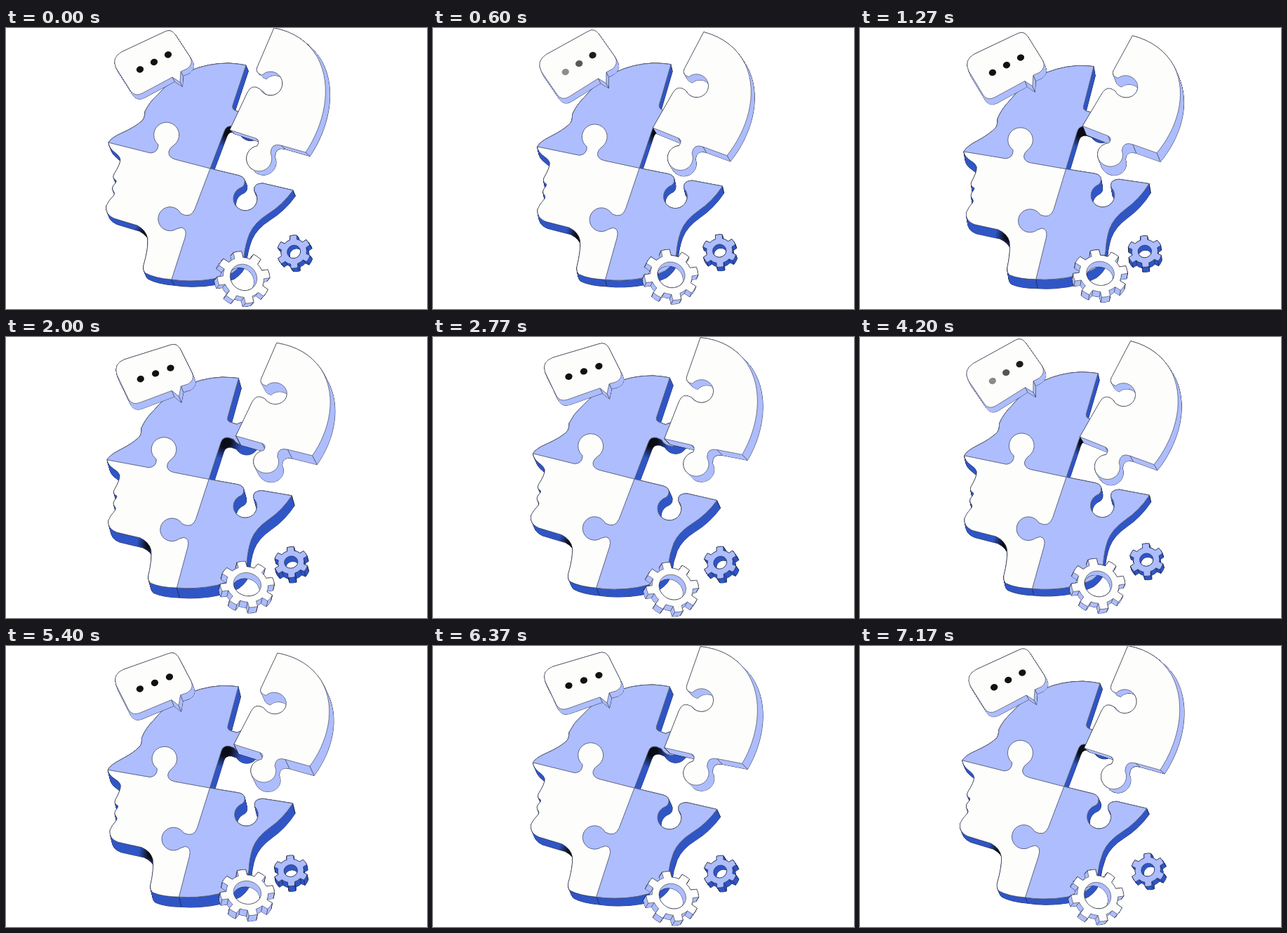
An HTML page with a canvas for the animation above (7.21 s loop, 600 by 400 pixels).

```html
<!DOCTYPE html>
<html lang="en">
<head>
<meta charset="utf-8">
<title>Puzzle head</title>
<style>
html, body { margin: 0; width: 100%; height: 100%; overflow: hidden; background: #fff; }
canvas { display: block; }
</style>
</head>
<body>
<canvas id="stage" width="600" height="400"></canvas>
<script>
const ctx = document.getElementById('stage').getContext('2d');
const PERIOD = 3605;
const WHITE = '#fdfdfc', LIGHT = '#adbdfe', DEEP = '#3056c6', INK = '#15151c', SEAM = '#5d6582';

// Head outline in three runs, plus the two inner seams.
const crown = 'M146 163Q150 156 166 149Q184 141 194 132Q198 128 198 119Q204 106 216 95' +
  'Q256 50 318 50Q332 51 342 53L324 107Q320 116 328 118L336 121A17 17 0 1 1 330 143L323 140Q314 138 311 147L291 200';
const nape = 'L332 210Q342 213 340 221Q339 226 333 228A17 17 0 1 0 354 232Q352 221 366 221L409 231' +
  'Q394 252 373 265Q354 277 347 293Q341 308 339 326Q336 340 322 349Q298 360 262 360Q248 360 236 358';
const profile = 'Q212 356 199 349Q195 346 196 338Q203 314 202 300Q200 288 187 281Q170 276 154 271' +
  'Q141 265 143 253Q146 246 153 239Q156 236 153 232Q150 228 154 223Q158 219 157 217' +
  'Q151 214 154 208Q163 194 163 187Q162 182 155 177Q147 171 146 163Z';
const browSeam = 'L241 187Q231 184 232 176Q233 171 239 167A18 18 0 1 0 217 166Q217 177 206 178Z';
const neckSeam = 'L255 299Q259 286 250 284L243 286A17 17 0 1 1 249 264Q263 272 269 258Z';

const head = new Path2D(crown + nape + profile);
const brain = new Path2D(crown + browSeam);
const neck = new Path2D('M291 200' + nape + neckSeam);
const piece = new Path2D('M382 0L358 56Q355 64 365 67A17 17 0 1 1 362 87Q350 79 344 92L319 145L356 157' +
  'Q363 160 358 168A18 18 0 1 0 377 178Q378 163 392 167L427 177C452 140 467 85 444 42Q424 8 382 0Z');
const bubble = new Path2D('M165 34L227 5Q235 1 241 9L262 41Q268 51 258 58L249 62L248 77L237 70L194 93' +
  'Q184 98 178 90L157 57Q150 42 165 34Z');

// Sway: origin, then [x, x/X, x/Y, y, y/X, y/Y] for the cosine and sine parts.
const headSway = { at: [291, 200],
  cos: [0.3, 0.0072, -0.0325, -1.05, 0.0331, 0.0209],
  sin: [3.75, -0.0031, 0.0259, -1.25, -0.0295, 0.0005] };
const pieceSway = { at: [319, 145],
  cos: [-3, 0.0009, -0.0031, 2.5, -0.0095, 0.0476],
  sin: [-8.2, -0.0027, -0.0784, -2, 0.0841, -0.0027] };
const bubbleSway = { at: [211, 48],
  cos: [-0.5, 0, 0.05, -2, -0.05, 0],
  sin: [-3.6, 0, 0.095, 1.3, -0.085, 0.05] };

function gear(teeth, start, tip, base, root, hole) {
  const path = new Path2D(), step = 2 * Math.PI / teeth, corners = [];
  for (let i = 0; i < teeth; i++) {
    const a = start + i * step;
    path.arc(0, 0, 1, a - tip, a + tip);
    path.arc(0, 0, root, a + base, a + step - base);
    for (const [r, b] of [[1, -tip], [1, tip], [root, base], [root, -base]])
      corners.push([r * Math.cos(a + b), r * Math.sin(a + b)]);
  }
  path.closePath();
  path.moveTo(hole, 0);
  path.arc(0, 0, hole, 0, 2 * Math.PI);
  return { path, corners };
}
const bigGear = gear(8, -1.76, 0.16, 0.21, 0.77, 0.51);
const smallGear = gear(6, -1.63, 0.2, 0.27, 0.76, 0.4);

function swayMatrix({ at: [x, y], cos, sin }, c, s) {
  const [tx, xx, xy, ty, yx, yy] = cos.map((v, i) => v * (c - 1) + sin[i] * s);
  return new DOMMatrix([1 + xx, yx, xy, 1 + yy, x + tx, y + ty]).translate(-x, -y);
}

// A tilted disc is foreshortened along the direction in which its side shows.
function tiltMatrix(x, y, radius, [dx, dy], thickness) {
  const length = Math.hypot(dx, dy), ux = dx / length, uy = dy / length;
  const loss = 1 - Math.sqrt(1 - (length / thickness) ** 2), skew = -radius * loss * ux * uy;
  return new DOMMatrix([radius * (1 - loss * ux * ux), skew, skew, radius * (1 - loss * uy * uy), x, y]);
}

function place(path, matrix) {
  const placed = new Path2D();
  placed.addPath(path, matrix);
  return placed;
}

function paint(path, fill, line, width) {
  ctx.fillStyle = fill;
  ctx.fill(path, 'evenodd');
  ctx.strokeStyle = line;
  ctx.lineWidth = width;
  ctx.stroke(path);
}

function sides(path, matrix, [dx, dy], colour, corners = []) {
  const steps = 16;
  const sweep = draw => {
    for (let i = steps; i >= 0; i--) {
      ctx.save();
      ctx.translate(dx * i / steps, dy * i / steps);
      draw();
      ctx.restore();
    }
  };
  ctx.strokeStyle = INK;
  ctx.lineWidth = 0.8;
  sweep(() => ctx.stroke(path));
  ctx.fillStyle = colour;
  sweep(() => ctx.fill(path, 'evenodd'));
  ctx.lineWidth = 0.6;
  ctx.beginPath();
  for (const [x, y] of corners) {
    const p = matrix.transformPoint({ x, y });
    ctx.moveTo(p.x, p.y);
    ctx.lineTo(p.x + dx, p.y + dy);
  }
  ctx.stroke();
}

function solid(shape, matrix, depth, face, side, corners) {
  const path = place(shape, matrix);
  sides(path, matrix, depth, side, corners);
  paint(path, face, INK, 0.5);
}

function shade(matrix, x, y, radius) {
  const p = matrix.transformPoint({ x, y });
  const glow = ctx.createRadialGradient(p.x, p.y, radius * 0.3, p.x, p.y, radius);
  glow.addColorStop(0, '#0b0d16');
  glow.addColorStop(1, 'rgba(11,13,22,0)');
  ctx.globalCompositeOperation = 'source-atop';
  ctx.fillStyle = glow;
  ctx.fillRect(p.x - radius, p.y - radius, 2 * radius, 2 * radius);
  ctx.globalCompositeOperation = 'source-over';
}

function drawHead(c, s) {
  const m = swayMatrix(headSway, c, s), outline = place(head, m);
  sides(outline, m, [3.5 - 1.5 * s, 11.3 - 3 * c], DEEP, [[236, 358], [409, 231], [332, 210]]);
  shade(m, 202, 292, 20);
  shade(m, 317, 147, 24);
  paint(outline, WHITE, INK, 0.5);
  paint(place(brain, m), LIGHT, SEAM, 1);
  paint(place(neck, m), LIGHT, SEAM, 1);
}

function drawBubble(c, s, phase) {
  const m = swayMatrix(bubbleSway, c, s);
  solid(bubble, m, [3.5, 7.5 - 1.2 * c], WHITE, LIGHT, [[249, 62], [248, 77], [237, 70]]);
  for (let i = 0; i < 3; i++) {
    const u = Math.min(1, Math.max(0, (phase - 342 - 100 * i) / 600));
    const p = m.transformPoint({ x: 191 + 20 * i, y: 59 - 10.5 * i });
    ctx.globalAlpha = 1 - 0.275 * (1 - Math.cos(2 * Math.PI * u));
    ctx.fillStyle = '#111';
    ctx.beginPath();
    ctx.ellipse(p.x, p.y, 5.2, 4.6, -0.3, 0, 2 * Math.PI);
    ctx.fill();
  }
  ctx.globalAlpha = 1;
}

function drawGears(c, s) {
  const smallDepth = [2.5 + c - 1.5 * s, 6.2 - 1.5 * c];
  const bigDepth = [-2.8 - 1.2 * c + s, 6.5 - 1.7 * c];
  solid(smallGear.path,
    tiltMatrix(408 + 2.2 * c - s, 319.2 - 0.7 * c - 2 * s, 24.5, smallDepth, 17),
    smallDepth, LIGHT, DEEP, smallGear.corners);
  solid(bigGear.path,
    tiltMatrix(341.2 - 2.7 * c - 0.4 * s, 353 + 2 * c - 3 * s, 39, bigDepth, 15),
    bigDepth, WHITE, LIGHT, bigGear.corners);
}

function frame() {
  const phase = performance.now() % PERIOD, angle = 2 * Math.PI * phase / PERIOD;
  const c = Math.cos(angle), s = Math.sin(angle);
  ctx.clearRect(0, 0, 600, 400);
  ctx.lineJoin = 'round';
  drawHead(c, s);
  solid(piece, swayMatrix(pieceSway, c, s), [6.3 - 1.5 * s, 9.5 - 4 * c + s], WHITE, LIGHT,
    [[319, 145], [356, 157], [392, 167], [427, 177]]);
  drawBubble(c, s, phase);
  drawGears(c, s);
  requestAnimationFrame(frame);
}
frame();
</script>
</body>
</html>
```
